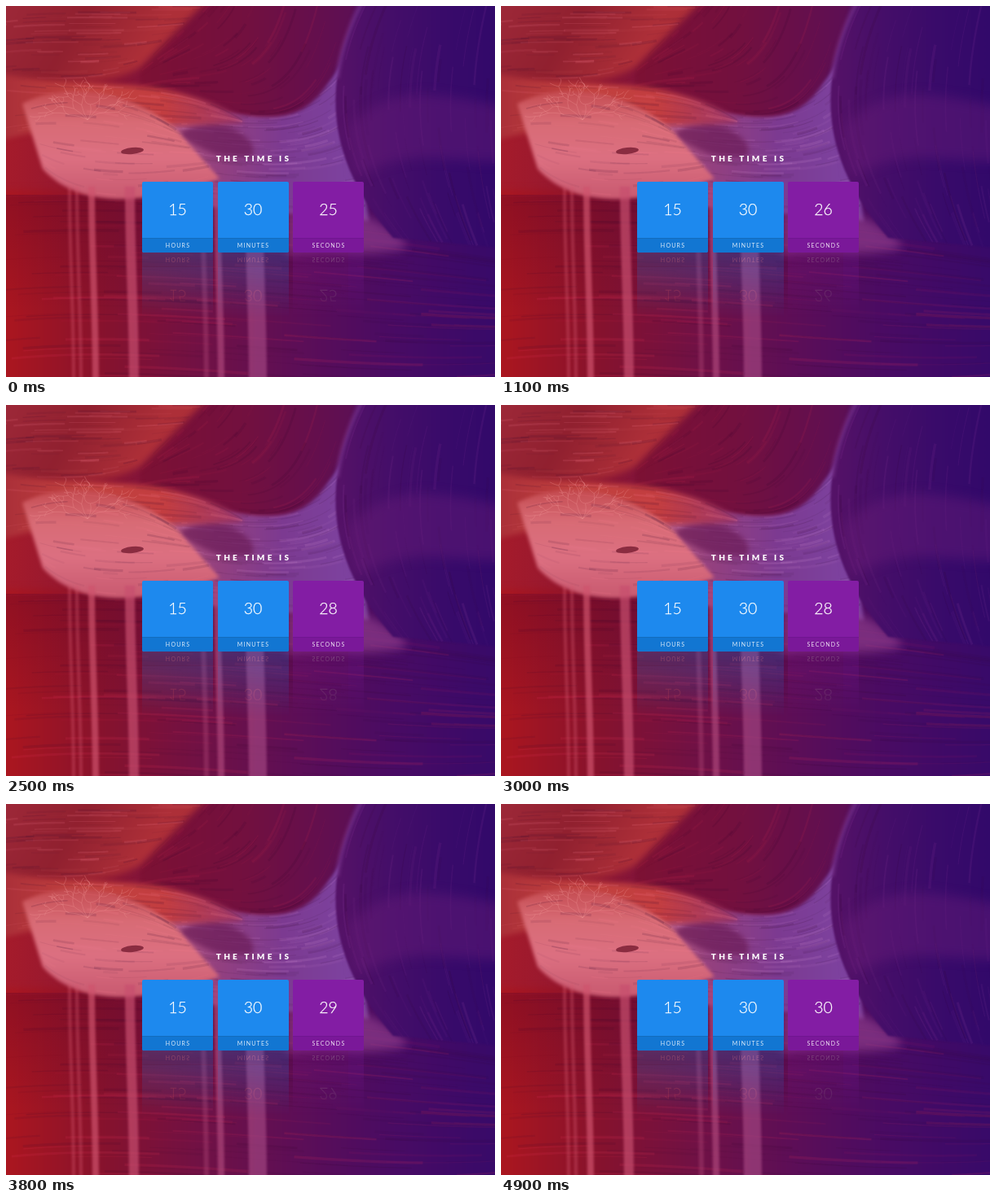
An HTML page with a canvas that plays this animation: 600x456 px, repeating every 5 s.

```html
<!DOCTYPE html>
<html lang="en">
<head>
<meta charset="utf-8">
<title>Clock</title>
<style>
  html, body { margin: 0; width: 100%; height: 100%; overflow: hidden; background: #6a1050; }
  body { position: relative; font-family: Lato, sans-serif; color: #fff; }
  canvas { position: absolute; left: 0; top: 0; }
  h1 {
    position: absolute; left: 4px; top: 180px; width: 600px; margin: 0;
    font-size: 10px; font-weight: 900; line-height: 14px;
    letter-spacing: 3.2px; text-align: center;
  }
  .card {
    position: absolute; top: 216px; width: 87px; height: 87px;
    border-radius: 2px; overflow: hidden; text-align: center; background: #1d89ee;
    -webkit-box-reflect: below 0 linear-gradient(transparent 8%, rgba(0, 0, 0, .27));
  }
  .card b {
    display: block; height: 69px; font-size: 19.5px; font-weight: 300; line-height: 68px;
    -webkit-text-stroke: .25px #fff;
  }
  .card span {
    display: block; box-sizing: border-box; height: 18px; padding-left: 1px;
    border-top: 1px solid #126cbd; background: #1276d2; color: rgba(255, 255, 255, .85);
    font-size: 7px; line-height: 17px; letter-spacing: 1.2px;
  }
  .seconds { background: #831da4; }
  .seconds span { border-color: #701590; background: #7a1899; }
</style>
</head>
<body>
<canvas id="scene" width="600" height="456"></canvas>
<h1>THE TIME IS</h1>
<div class="card" style="left:167px"><b>15</b><span>HOURS</span></div>
<div class="card" style="left:259.5px"><b>30</b><span>MINUTES</span></div>
<div class="card seconds" style="left:352px"><b id="sec">25</b><span>SECONDS</span></div>
<script>
const ctx = document.getElementById('scene').getContext('2d');
const sec = document.getElementById('sec');

let seed = 11;
function rand(a, b) {
  seed = (seed * 16807) % 2147483647;
  return a + (b - a) * seed / 2147483647;
}

function gradient(x0, y0, x1, y1, ...colors) {
  const g = ctx.createLinearGradient(x0, y0, x1, y1);
  colors.forEach((c, i) => g.addColorStop(i / (colors.length - 1), c));
  return g;
}

// Point on a cubic curve given as eight coordinates.
function at(c, t) {
  const u = 1 - t, w = [u * u * u, 3 * u * u * t, 3 * u * t * t, t * t * t];
  const sum = k => w.reduce((s, v, i) => s + v * c[2 * i + k], 0);
  return [sum(0), sum(1)];
}

function trace(c, from = 0, to = 1) {
  for (let i = 0; i <= 24; i++) ctx.lineTo(...at(c, from + (to - from) * i / 24));
}

// Soft-edged area between two curves, with grain that runs along them.
function band(a, b, fill, { blur = 2, alpha = 1, grain = 0, light = '255,130,150' } = {}) {
  ctx.filter = `blur(${blur}px)`;
  ctx.globalAlpha = alpha;
  ctx.fillStyle = fill;
  ctx.beginPath();
  trace(a);
  trace(b, 1, 0);
  ctx.fill();
  ctx.filter = 'none';
  ctx.globalAlpha = 1;
  for (let i = 0; i < grain; i++) {
    const k = rand(0.03, 0.97), t = rand(0, 0.9);
    const tone = rand(0, 1) < 0.5 ? light : '50,0,45';
    ctx.strokeStyle = `rgba(${tone},${rand(0.03, 0.15)})`;
    ctx.lineWidth = rand(0.6, 3.5);
    ctx.beginPath();
    trace(a.map((v, j) => v + (b[j] - v) * k), t, Math.min(1, t + rand(0.08, 0.3)));
    ctx.stroke();
  }
}

function twig(x, y, angle, len, depth) {
  const x1 = x + Math.cos(angle) * len, y1 = y + Math.sin(angle) * len * 0.8;
  ctx.beginPath();
  ctx.moveTo(x, y);
  ctx.quadraticCurveTo((x + x1) / 2 + rand(-4, 4), (y + y1) / 2 + rand(-4, 4), x1, y1);
  ctx.stroke();
  if (!depth) return;
  for (const side of [-1, 1]) {
    twig(x1, y1, angle + side * rand(0.1, 0.8), len * rand(0.5, 0.9), depth - 1);
  }
}

function cave() {
  ctx.fillStyle = gradient(0, 0, 600, 0, '#a51b2b', '#8d1632', '#751344', '#5d1056', '#480d65', '#370a6b');
  ctx.fillRect(0, 0, 600, 456);
  band([-20, 228, 150, 220, 400, 230, 620, 280], [-20, 470, 200, 440, 400, 500, 620, 470],
    gradient(0, 0, 600, 0, '#ab161f', '#86122d', '#701145', '#5c0e57', '#480b64', '#380a69'),
    { blur: 4, grain: 170, light: '225,50,90' });
  ctx.fillStyle = gradient(0, 225, 0, 380, 'rgba(80,0,40,.3)', 'rgba(80,0,40,0)');
  ctx.fillRect(0, 232, 420, 150);
}

function walls() {
  band([180, 122, 260, 105, 360, 160, 420, 60], [180, 225, 260, 265, 390, 250, 445, 265],
    gradient(180, 0, 420, 0, '#bd5e7c', '#93407f', '#7c3a91', '#7d429f'),
    { grain: 130, light: '220,150,215' });
  band([215, 155, 240, 138, 285, 142, 303, 172], [215, 160, 240, 178, 270, 190, 303, 185],
    '#6a1c58', { blur: 3, alpha: 0.7 });
  band([165, 75, 200, 30, 230, 0, 250, -20], [165, 118, 300, 115, 390, 215, 432, -20],
    gradient(160, 0, 430, 0, '#7d1133', '#72103f', '#5c0f55'), { grain: 80, light: '190,40,80' });
  band([-20, -20, 60, -30, 150, -30, 260, -20], [-20, 100, 30, 85, 100, 110, 165, 75],
    gradient(0, 0, 150, 90, '#9d2838', '#90202f', '#ad2f38'), { blur: 4, grain: 90 });
}

function ledge() {
  band([-20, 80, 100, 110, 190, 75, 290, 140], [-20, 170, 60, 140, 170, 150, 290, 144],
    gradient(0, 0, 290, 0, '#ab3039', '#c2423f', '#c33d40', '#993568'), { blur: 3, grain: 50 });
  band([20, 120, 80, 90, 150, 105, 205, 148], [45, 200, 90, 250, 170, 245, 262, 212],
    gradient(0, 100, 0, 230, '#c2484d', '#d86b75', '#dc7081', '#cb5c72'), { grain: 60 });

  ctx.fillStyle = '#8a2c40';
  ctx.beginPath();
  ctx.ellipse(155, 178, 14, 4, -0.1, 0, 7);
  ctx.fill();
  ctx.lineWidth = 0.6;
  ctx.strokeStyle = 'rgba(240,150,150,.5)';
  for (let i = 0; i < 6; i++) twig(100, 140, -2.8 + i * 0.46, 24, 3);
}

function rock() {
  const rim = [445, -20, 370, 110, 410, 210, 475, 285];
  band([345, 255, 400, 235, 450, 255, 490, 290], [345, 306, 400, 298, 440, 310, 490, 298],
    '#93408e', { blur: 6, alpha: 0.65 });
  band(rim, [640, -20, 620, 100, 620, 200, 640, 300],
    gradient(410, 0, 600, 0, '#541267', '#440e69', '#390b6a', '#32096a'),
    { blur: 1, grain: 90, light: '150,60,160' });
  band([420, 150, 470, 90, 540, 110, 620, 125], [430, 210, 500, 170, 540, 195, 620, 190],
    '#6b1f7c', { blur: 7, alpha: 0.4 });
  ctx.filter = 'blur(2px)';
  ctx.lineWidth = 5;
  ctx.strokeStyle = 'rgba(135,65,155,.55)';
  ctx.beginPath();
  trace(rim, 0, 0.3);
  ctx.stroke();
  ctx.filter = 'none';
}

function sand() {
  const streams = [[78, 4], [87, 4], [105, 8], [152, 12], [241, 6], [259, 8], [304, 22]];
  for (const [x, w] of streams) {
    const tint = gradient(70, 0, 310, 0, '#d4566a', '#c04a70', '#a04480');
    const edge = x - w / 2, drift = 5;
    band([edge, 222, edge, 300, edge + drift, 380, edge + drift, 470],
      [edge + w, 222, edge + w, 300, edge + w + drift, 380, edge + w + drift, 470],
      tint, { blur: 1.5, alpha: w < 7 ? 0.4 : 0.7 });
  }
}

cave();
walls();
ledge();
rock();
sand();

function tick() {
  const t = performance.now() % 5000;
  const text = String(25 + Math.floor((t + 700) / 1000));
  if (sec.textContent !== text) sec.textContent = text;
  requestAnimationFrame(tick);
}
tick();
</script>
</body>
</html>
```
